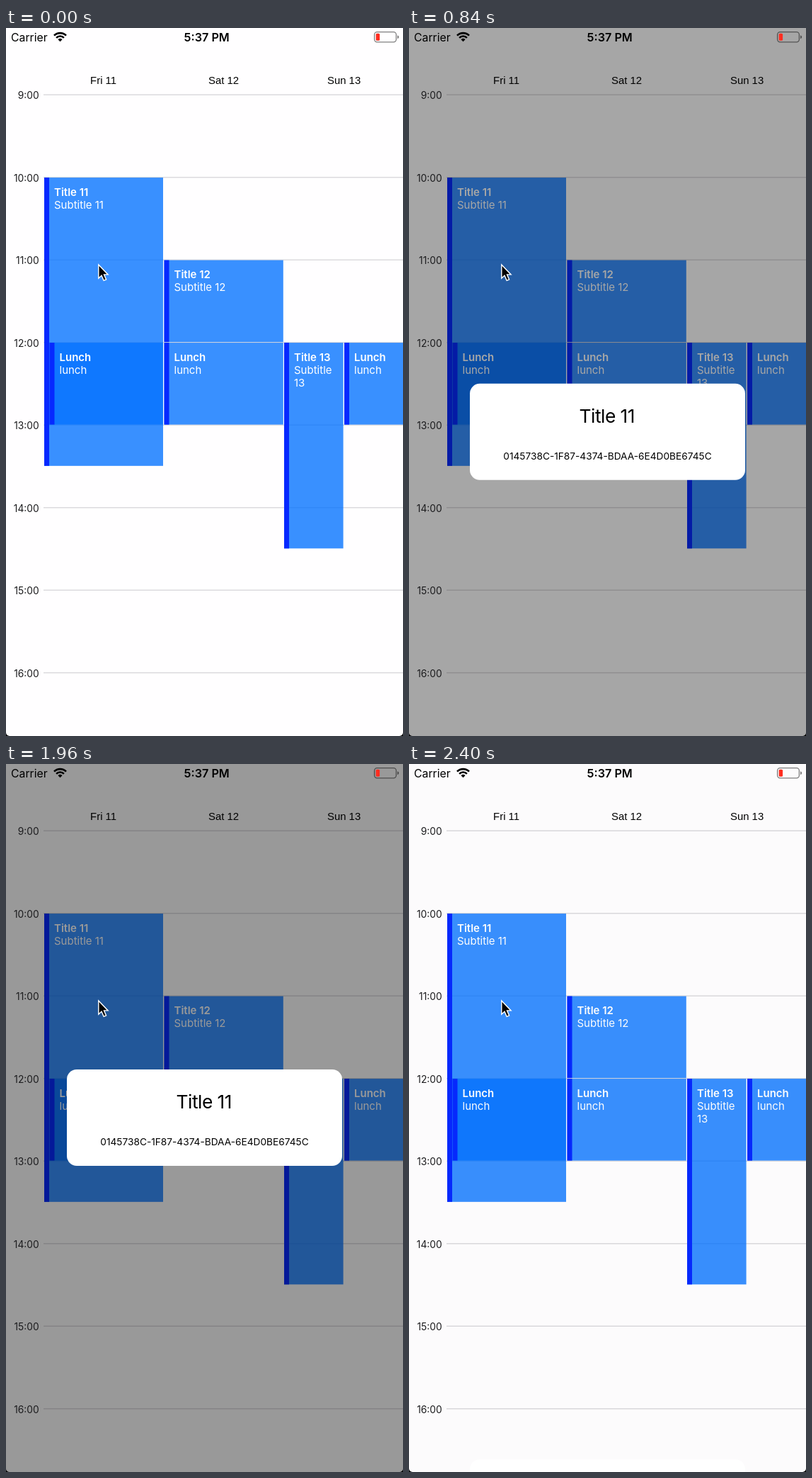
Animation, 561 px wide and 999 px high, one loop 2.44 s. Source, as an HTML page:

```html
<!DOCTYPE html>
<html lang="en">
<head>
<meta charset="utf-8">
<title>Calendar popup</title>
<style>
  html, body { margin: 0; height: 100%; overflow: hidden; background: #000; }
  svg { display: block; width: 561px; height: 999px; background: #fffeff; border-radius: 0 0 5px 5px; }
  text { font-family: Inter, sans-serif; white-space: pre; }
  .bold { font-weight: 600; }
  .mid { text-anchor: middle; }
  .day { font: 14.9px "Liberation Sans", Arial, sans-serif; }
  .hour { font-size: 13.8px; text-anchor: end; fill: #1c1c1e; }
  .event { font-size: 15px; fill: #fff; }
</style>
</head>
<body>
<svg viewBox="0 0 561 999">
  <g id="grid"></g>
  <g id="events"></g>
  <rect id="dim" width="561" height="999"/>
  <g id="days"></g>
  <g id="hours"></g>

  <text x="7" y="19" font-size="15.8">Carrier</text>
  <g transform="translate(76.5 19.2)" fill="none" stroke="#000" stroke-width="2.6">
    <path d="M-8.5-8.5A12 12 0 0 1 8.5-8.5M-5.4-5.4A7.6 7.6 0 0 1 5.4-5.4"/>
    <path d="M0 0L-3-3A4.3 4.3 0 0 1 3-3Z" fill="#000" stroke="none"/>
  </g>
  <text class="bold mid" x="283.7" y="19" font-size="16.2">5:37 PM</text>
  <rect x="520.6" y="5.6" width="30.8" height="14.2" rx="3.8" fill="none" stroke="#000" stroke-opacity=".5" stroke-width="1.3"/>
  <path d="M553 10.2q2.2.6 2.2 2.5t-2.2 2.5z" fill-opacity=".5"/>
  <rect x="522.7" y="7.7" width="5.4" height="10" rx="1.5" fill="#ff2d20"/>

  <path d="M130.8 334v19.2l4.2-4 3.1 7.2 3.5-1.5-3.1-7h5.6z" stroke="#fff" stroke-width="1.4"/>

  <g id="card">
    <rect x="86" width="389" height="136" rx="14" fill="#fff"/>
    <text class="mid" x="279.8" y="55" font-size="26.3" letter-spacing="-.5">Title 11</text>
    <text class="mid" x="280.5" y="107.3" font-size="13.7">0145738C-1F87-4374-BDAA-6E4D0BE6745C</text>
  </g>
</svg>
<script>
const LOOP = 2440, REST_TOP = 431, TRAVEL = 568;
const HOUR = 116.5, FIRST_LINE = 94.2;
const byId = id => document.getElementById(id);
const add = (id, markup) => byId(id).insertAdjacentHTML('beforeend', markup);

for (let i = 0; i < 8; i++) {
  const y = FIRST_LINE + i * HOUR;
  add('grid', `<rect x="53" y="${y - 0.7}" width="508" height="1.5" fill="#dcdbde"/>`);
  add('hours', `<text class="hour" x="46.7" y="${y + 6}">${9 + i}:00</text>`);
}

['Fri 11', 'Sat 12', 'Sun 13'].forEach((day, i) =>
  add('days', `<text class="day mid" x="${137.6 + i * 170}" y="78.6">${day}</text>`));

function addEvent(left, right, start, end, title, ...lines) {
  const top = FIRST_LINE + (start - 9) * HOUR + 0.4;
  const height = (end - start) * HOUR - 1;
  add('events', `
    <rect x="${left}" y="${top}" width="${right - left}" height="${height}" fill="rgb(5,115,255)" fill-opacity=".787"/>
    <rect x="${left}" y="${top}" width="7" height="${height}" fill="#0629ff"/>
    <text class="event bold" x="${left + 14}" y="${top + 25.6}">${title}</text>`);
  lines.forEach((line, i) =>
    add('events', `<text class="event" x="${left + 14}" y="${top + 43.6 + i * 18}">${line}</text>`));
}
addEvent(54, 222, 10, 13.5, 'Title 11', 'Subtitle 11');
addEvent(61.5, 222, 12, 13, 'Lunch', 'lunch');
addEvent(223.5, 391.8, 11, 12, 'Title 12', 'Subtitle 12');
addEvent(223.5, 391.8, 12, 13, 'Lunch', 'lunch');
addEvent(393, 476.6, 12, 14.5, 'Title 13', 'Subtitle', '13');
addEvent(478, 561, 12, 13, 'Lunch', 'lunch');

// Critically damped spring from 0 to 1; rate is per millisecond.
function spring(elapsed, rate) {
  const x = Math.max(0, elapsed) * rate;
  return 1 - (1 + x) * Math.exp(-x);
}

function draw(now) {
  const t = now % LOOP;
  const shown = spring(t - 660.5, 0.02) - spring(t - 2126, 0.0193);
  byId('card').setAttribute('transform', `translate(0 ${REST_TOP + TRAVEL * (1 - shown)})`);
  byId('dim').setAttribute('opacity', 0.4 * shown);
  requestAnimationFrame(draw);
}
draw(performance.now());
</script>
</body>
</html>
```
